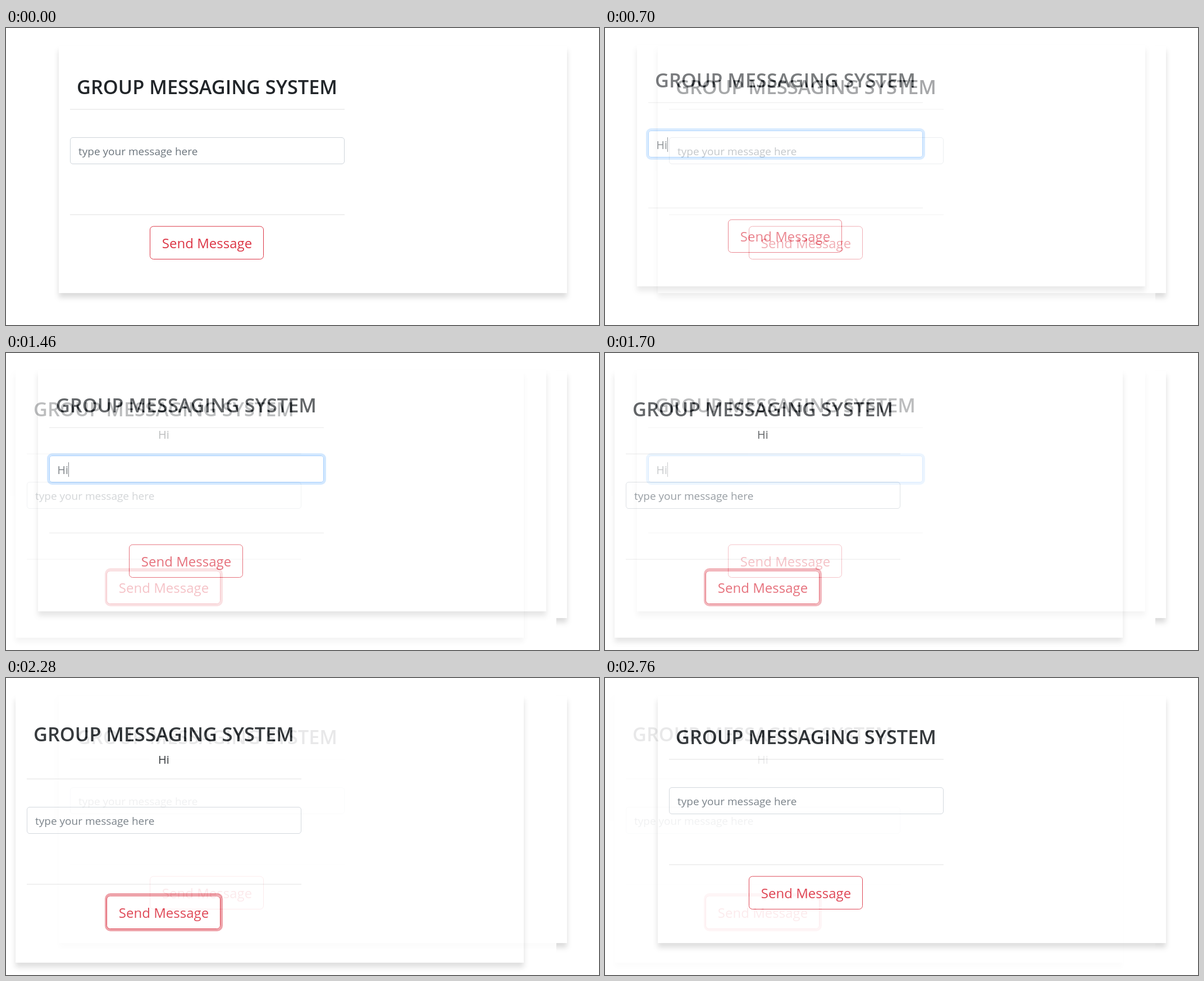
Write an HTML page that moves like this. It is 1056 by 530 pixels and loops after 2820 ms.

```html
<!DOCTYPE html>
<html lang="en">
<head>
<meta charset="utf-8">
<title>Group messaging system</title>
<style>
  html, body { margin: 0; width: 100%; height: 100%; overflow: hidden; background: #fff; }
  svg { display: block; width: 1056px; height: 530px; font-family: "Open Sans", "Noto Sans", sans-serif; }

  .card { fill: #fff; filter: drop-shadow(0 8px 5px rgba(0, 0, 0, .14)); }
  .title { font-size: 34.3px; font-weight: 600; fill: #212529; text-anchor: middle; }
  .rule { fill: rgba(0, 0, 0, .1); }
  .input { fill: #fff; stroke: var(--input-line, #ced4da); }
  .ring { fill: none; stroke-width: 4; }
  .input-ring { stroke: var(--input-ring, none); }
  .button { fill: #fff; stroke: #dc3545; }
  .button-ring { stroke: var(--button-ring, none); }
  .label { font-size: 24px; fill: #dc3545; text-anchor: middle; }
  .hint { font-size: 19px; fill: #6c757d; }
  .typed { font-size: 19.5px; fill: #495057; }
  .sent { font-size: 20px; fill: #212529; text-anchor: middle; }

  .typing { --input-line: #80bdff; --input-ring: rgba(0, 123, 255, .25); }
  .posted { --button-ring: rgba(220, 53, 69, .5); }

  /* Each scene fades over the one below in 60 ms steps. */
  .layer { opacity: 0; clip-path: inset(0 76px 0 0); animation: 2820ms linear infinite; }
  #typing { animation-name: typing; }
  #posted { animation-name: posted; }

  @keyframes typing {
    0% { opacity: 0; animation-timing-function: step-end; }
    14.184% { opacity: 0; animation-timing-function: steps(9, start); }
    33.332% { opacity: .9; animation-timing-function: step-start; }
    33.333%, 66.666% { opacity: 1; animation-timing-function: step-end; }
    66.667%, 100% { opacity: 0; }
  }
  @keyframes posted {
    0% { opacity: 0; animation-timing-function: step-end; }
    47.517% { opacity: 0; animation-timing-function: steps(9, start); }
    66.665% { opacity: .9; animation-timing-function: step-start; }
    66.666% { opacity: 1; animation-timing-function: step-end; }
    80.851% { opacity: 1; animation-timing-function: steps(9, start); }
    100% { opacity: .1; }
  }
</style>
</head>
<body>
<svg viewBox="0 0 1056 530">
  <defs>
    <text id="title" class="title" x="358" y="118">GROUP MESSAGING SYSTEM</text>
    <text id="hint" class="hint" x="129" y="227">type your message here</text>
    <g id="form">
      <rect class="rule" x="114" y="144.5" width="489" height="1.25"/>
      <rect class="ring input-ring" x="112" y="193" width="493" height="52" rx="7"/>
      <rect class="input" x="114.5" y="195.5" width="488" height="47" rx="4.5"/>
      <rect class="rule" x="114" y="332.5" width="489" height="1.25"/>
      <rect class="ring button-ring" x="255" y="351" width="206" height="64" rx="8"/>
      <rect class="button" x="256.5" y="354" width="202" height="58.5" rx="6"/>
      <text class="label" x="358" y="393">Send Message</text>
    </g>
  </defs>

  <g>
    <rect width="1056" height="530" fill="#fff"/>
    <rect class="card" x="94" y="32" width="905" height="441"/>
    <use href="#title"/>
    <use href="#form"/>
    <use href="#hint"/>
  </g>

  <g id="typing" class="layer">
    <rect width="1056" height="530" fill="#fff"/>
    <g class="typing" transform="translate(-37 -12)">
      <rect class="card" x="94" y="42" width="905" height="431"/>
      <use href="#title"/>
      <use href="#form"/>
      <text class="typed" x="128.5" y="227.5">Hi</text>
      <rect x="148" y="207" width="1" height="26" fill="#495057"/>
    </g>
  </g>

  <g id="posted" class="layer">
    <rect width="1056" height="530" fill="#fff"/>
    <g class="posted" transform="translate(-77 -5)">
      <rect class="card" x="94" y="36" width="905" height="477"/>
      <use href="#title"/>
      <text class="sent" x="358" y="158">Hi</text>
      <g transform="translate(0 40)">
        <use href="#form"/>
        <use href="#hint"/>
      </g>
    </g>
  </g>
</svg>
</body>
</html>
```
